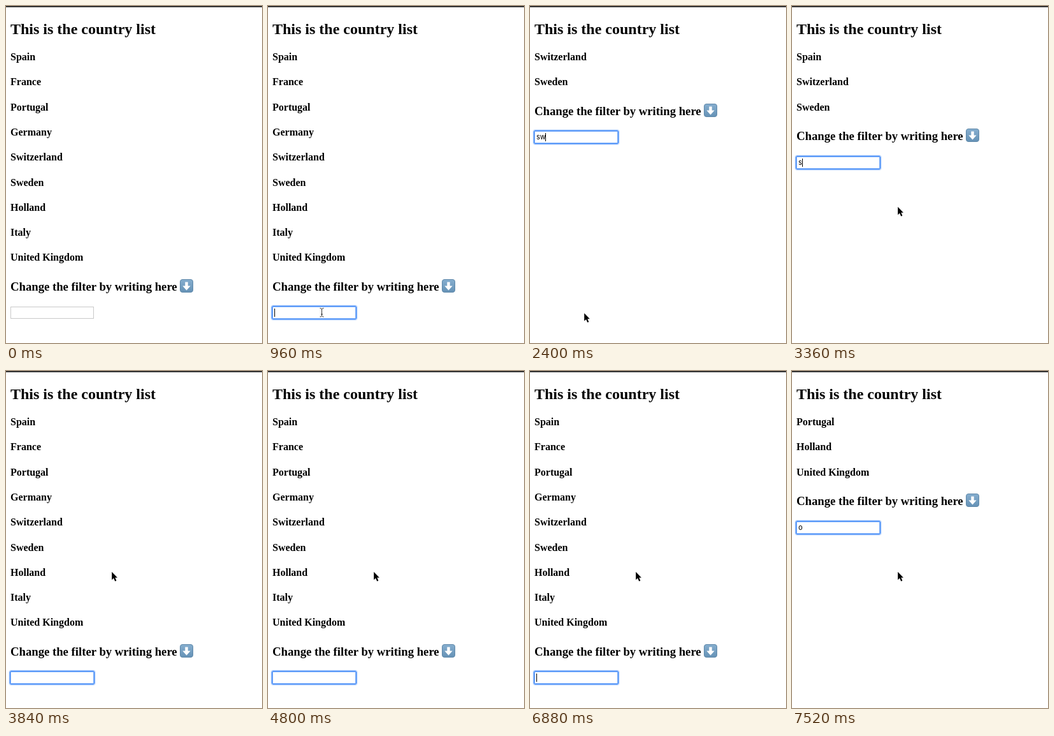
Write an HTML page that moves like this. It is 402 by 528 pixels and loops after 8000 ms.

```html
<!DOCTYPE html>
<html lang="en">
<head>
<meta charset="utf-8">
<title>Country filter</title>
<style>
  html, body { margin: 0; width: 100%; height: 100%; overflow: hidden; background: #fff; }
  svg { display: block; }
  text { font-family: "Liberation Serif", Times, serif; font-weight: bold; font-size: 16px; }
  .title { font-size: 24px; }
  .prompt { font-size: 18.72px; }
  .typed { font: 11px Inter, sans-serif; }
  .ring rect { fill: none; stroke: #3b86f7; }
</style>
</head>
<body>
<svg width="402" height="528" viewBox="0 0 402 528">
  <defs>
    <linearGradient id="tile" x2="0" y2="1">
      <stop offset="0" stop-color="#86aecf"/>
      <stop offset="1" stop-color="#6592b6"/>
    </linearGradient>
  </defs>
  <rect width="402" height="2" fill="#333"/>
  <text class="title" x="7" y="44">This is the country list</text>
  <g id="rows"></g>

  <!-- Prompt and field are drawn as they sit below a single row. -->
  <g id="prompt">
    <text class="prompt" x="7" y="131">Change the filter by writing here</text>
    <rect x="273.5" y="113.5" width="20" height="20" rx="3.5" fill="url(#tile)" stroke="#6089aa"/>
    <path d="M281.3 117.5h4.4v6h4l-6.2 7-6.2-7h4z" fill="#fff"/>
  </g>
  <g id="field">
    <rect id="border" x="7.5" y="157.5" width="130" height="18" fill="#fff" stroke="#c9c9c9"/>
    <g id="ring" class="ring">
      <rect x="4.5" y="154.5" width="136" height="24" rx="3.5" opacity=".15"/>
      <rect x="5.5" y="155.5" width="134" height="22" rx="2.5" opacity=".55"/>
      <rect x="6.5" y="156.5" width="132" height="20" rx="1.5" opacity=".95"/>
      <rect x="7.5" y="157.5" width="130" height="18" opacity=".6"/>
    </g>
    <text id="typed" class="typed" x="10" y="170"></text>
    <rect id="caret" y="160" width="1" height="13"/>
  </g>

  <path id="arrow" d="M0 0V12.4L2.9 9.8 5 14.6 7.2 13.7 5.1 9H8.7Z" stroke="#fff" stroke-width="1.2" paint-order="stroke"/>
  <path id="beam" d="M-3 -6.5Q-.5 -6.5 0 -5Q.5 -6.5 3 -6.5M0 -5V5.5M-3 7Q-.5 7 0 5.5Q.5 7 3 7M-1.5 3H1.5"
        fill="none" stroke="#333"/>
</svg>
<script>
const LOOP = 8000, BLINK = 480, ROW = 39.28, FOCUS = 960;
const countries = ["Spain", "France", "Portugal", "Germany", "Switzerland",
  "Sweden", "Holland", "Italy", "United Kingdom"];

const edits = [[0, ""], [1440, "s"], [2400, "sw"], [3040, "s"], [3840, ""],
  [4960, "f"], [6080, ""], [7040, "o"]];
const caretX = { "": 10, s: 16, sw: 24, f: 14, o: 17 };
// Focusing and typing restart the blink; deleting does not.
const blinkStarts = [[FOCUS], [1440], [2400], [4960], [7040]];
const pointer = [
  [0, ""],
  [160, "arrow", 97, 508.5], [320, "arrow", 92, 499], [480, "arrow", 88, 491],
  [640, "beam", 85, 484], [800, "beam", 84.5, 480],
  [FOCUS + BLINK, "arrow", 85.2, 481.2],
  [2560, "arrow", 106, 440], [2720, "arrow", 146, 360], [2880, "arrow", 166.2, 314.8]
];

const $ = id => document.getElementById(id);
const show = (el, on) => el.setAttribute("visibility", on ? "visible" : "hidden");
const move = (el, x, y) => el.setAttribute("transform", `translate(${x} ${y})`);
const latest = (list, t) => list.filter(item => item[0] <= t).pop();
const rowOffset = (n, bias) => Math.round(ROW * n + bias);

const rows = countries.map(name => {
  const row = document.createElementNS("http://www.w3.org/2000/svg", "text");
  row.textContent = name;
  row.setAttribute("x", 7);
  return $("rows").appendChild(row);
});

function drawList(query) {
  let count = 0;
  rows.forEach((row, i) => {
    const match = countries[i].toLowerCase().includes(query);
    show(row, match);
    if (match) row.setAttribute("y", 85 + rowOffset(count++, 0.2));
  });
  move($("prompt"), 0, rowOffset(count - 1, 0.3));
  move($("field"), 0, rowOffset(count - 1, 0.2));
}

function drawField(query, t) {
  const focused = t >= FOCUS;
  const start = latest(blinkStarts, t);
  show($("ring"), focused);
  show($("border"), !focused);
  show($("caret"), focused && Math.floor((t - start[0]) / BLINK) % 2 === 0);
  $("caret").setAttribute("x", caretX[query]);
  $("typed").textContent = query;
}

function drawPointer(t) {
  const [, shape, x, y] = latest(pointer, t);
  for (const id of ["arrow", "beam"]) {
    show($(id), id === shape);
    if (id === shape) move($(id), x, y);
  }
}

function frame() {
  const t = performance.now() % LOOP;
  const query = latest(edits, t)[1];
  drawList(query);
  drawField(query, t);
  drawPointer(t);
  requestAnimationFrame(frame);
}
frame();
</script>
</body>
</html>
```
